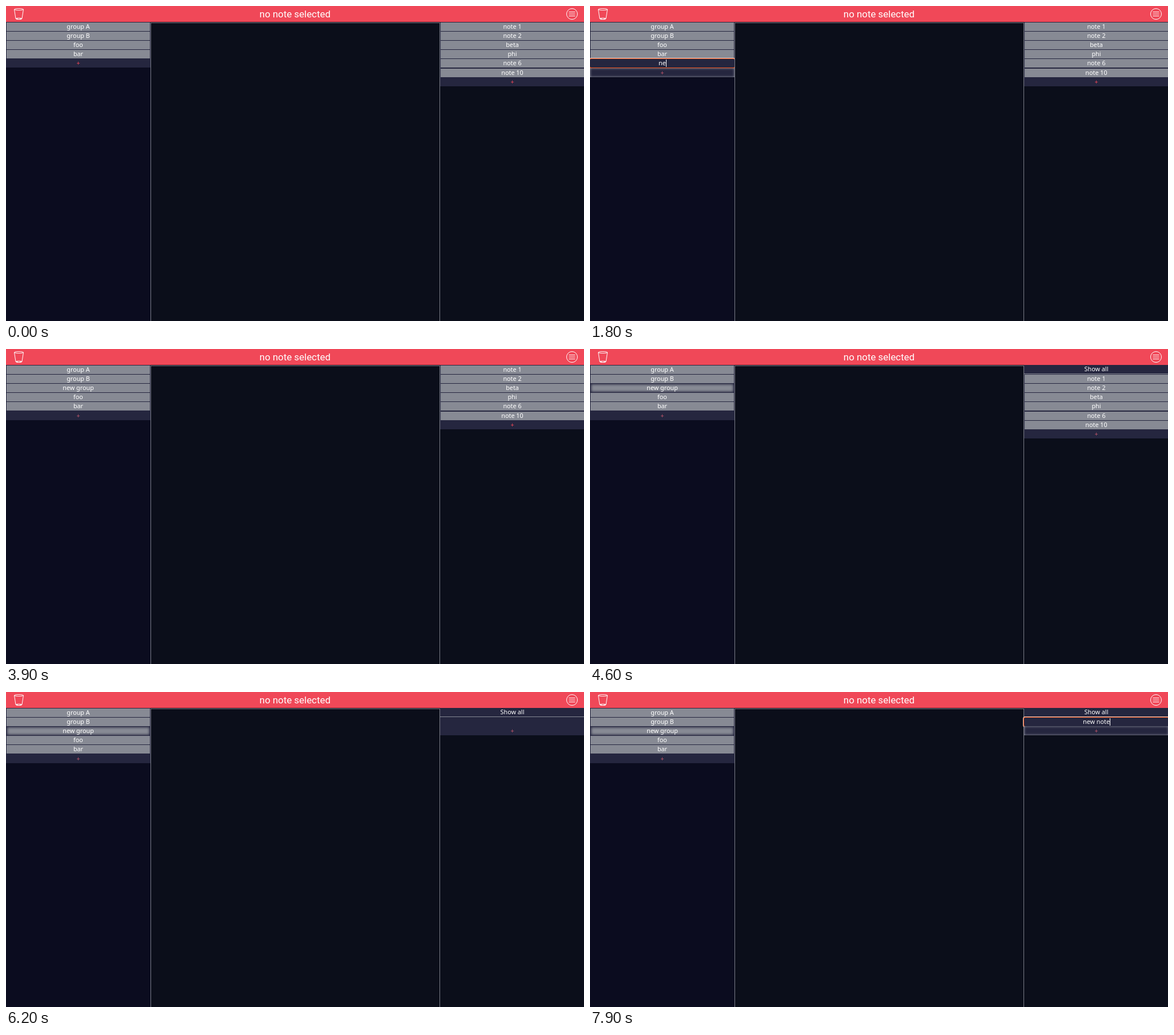
These frames come from a looping animation (1012 by 553 pixels, 8000 ms). An HTML page:

```html
<!DOCTYPE html>
<html lang="en">
<head>
<meta charset="utf-8">
<title>Notes</title>
<style>
  html, body { margin: 0; width: 100%; height: 100%; overflow: hidden; background: #0b0e1a; }
  #stage { position: relative; width: 1012px; height: 553px; overflow: hidden; color: #fff; }
  #stage div, svg { position: absolute; box-sizing: border-box; }
  header { position: absolute; width: 100%; height: 28px; background: #f04858;
    font: 16.9px/29px Roboto, sans-serif; text-align: center; }
  svg { left: 0; top: 0; fill: none; stroke: #fff; }
  #editor { left: 253px; top: 29px; width: 507px; height: 530px; border: 1px solid #7b7d88; }
  .panel { top: 28px; height: 525px; overflow: hidden;
    font: 10.8px/14px "Noto Sans", "Open Sans", sans-serif; text-align: center; }
  #groups { left: 0; width: 253px; background: #0b0c1f; }
  #notes { left: 758px; width: 254px; clip-path: none; background: linear-gradient(90deg, transparent 2px, #0b0e1a 2px); }
  #notes > div { left: 2px; width: 253px; }
  .list { top: 0; width: 253px; background: #25263f; }
  .row { left: 0; width: 253px; height: 15px; white-space: pre; }
  .item::before { content: ""; position: absolute; z-index: -1; inset: 0 0.6px 0 1px;
    background: #878a94; box-shadow: inset 0 0 4px 1px rgba(37, 38, 63, var(--glow, 0)); }
  .item { z-index: 0; }
  .add { height: 16px; line-height: 16px; background: #25263f; color: #f04858;
    box-shadow: inset 0 0 4px rgba(150, 152, 164, var(--glow, 0)); }
  .used { color: #c0566a; }
  .all { border-bottom: 1px solid #878a94; height: 16px; }
  .field { background: #25263f; }
  .focus { border-radius: 2px; box-shadow: 0 0 0 1px #e95420, 0 0 0 2px #f3cfc0; }
  .focus::after { content: ""; display: inline-block; width: 1px; height: 13px;
    margin-right: -1px; vertical-align: -3px; background: #fff; }
</style>
</head>
<body>
<div id="stage">
  <header>no note selected</header>
  <svg width="1012" height="28">
    <path d="M14.5 6 L17 22 Q22.500 25 28 22 L30.500 6"/>
    <ellipse cx="22.5" cy="6" rx="8" ry="1.4"/>
    <ellipse cx="22.5" cy="22.300" rx="5.500" ry="1.200"/>
    <circle cx="991" cy="14" r="9.5"/>
    <path d="M985.5 10.5h11m-11 3.500h11m-11 3.500h11"/>
  </svg>
  <div id="editor"></div>
  <div id="groups" class="panel"></div>
  <div id="notes" class="panel"></div>
</div>
<script>
const LOOP = 8000, PITCH = 16.1;
const NOTES = ["note 1", "note 2", "beta", "phi", "note 6", "note 10"];

// Each entry: [time, text typed so far]
const GROUP_KEYS = [[1700, "n"], [1800, "ne"], [2000, "new"], [2100, "new g"],
  [2300, "new gr"], [2400, "new gro"], [2500, "new grou"], [2600, "new group"]];
const NOTE_KEYS = [[7200, "n"], [7300, "ne"], [7400, "new"],
  [7600, "new n"], [7700, "new no"], [7800, "new not"], [7900, "new note"]];

const typed = (keys, t) => keys.reduce((text, [at, next]) => t >= at ? next : text, "");
const ramp = (t, start, length) => Math.min(1, Math.max(0, (t - start) / length));
const item = (text, glow = 0) => ({ text, type: "item", glow });
const field = (text, focused) => ({ text, type: focused ? "field focus" : "field" });
const add = (used, glow = 0) => ({ text: "+", type: used ? "add used" : "add", glow });

function groupRows(t) {
  const names = ["group A", "group B", "foo", "bar"];
  if (t >= 3900) names.splice(2, 0, "new group");
  else if (t >= 3000) names.push("new group");
  const rows = names.map(name => item(name, name === "new group" ? ramp(t, 4200, 200) : 0));
  if (t >= 800 && t < 3000) rows.push(field(typed(GROUP_KEYS, t), t >= 900));
  const glow = ramp(t, 900, 500) - ramp(t, 2900, 400);
  return [...rows, add(t >= 800, glow)];
}

function noteRows(t) {
  const rows = t < 5300 ? NOTES.map(name => item(name)) : [];
  if (t >= 4300) rows.unshift({ text: "Show all", type: "all" });
  if (t >= 6200) rows.push(field(typed(NOTE_KEYS, t), t >= 6300));
  return [...rows, add(t >= 4300, ramp(t, 6300, 400))];
}

function draw(panel, rows) {
  const top = i => Math.round(29 + PITCH * i) - 28;
  const html = rows.map(({ text, type, glow = 0 }, i) => {
    const shift = /add|all/.test(type) ? 1 : 0;
    return `<div class="row ${type}" style="top:${top(i) - shift}px;--glow:${glow.toFixed(2)}">${text}</div>`;
  }).join("");
  const next = `<div class="list" style="height:${top(rows.length - 1) + 15}px">${html}</div>`;
  if (panel.shown !== next) panel.innerHTML = panel.shown = next;
}

const groups = document.getElementById("groups");
const notes = document.getElementById("notes");
const start = performance.now();

function frame(now) {
  const t = Math.max(0, now - start) % LOOP;
  draw(groups, groupRows(t));
  draw(notes, noteRows(t));
  requestAnimationFrame(frame);
}
frame(start);
</script>
</body>
</html>
```
